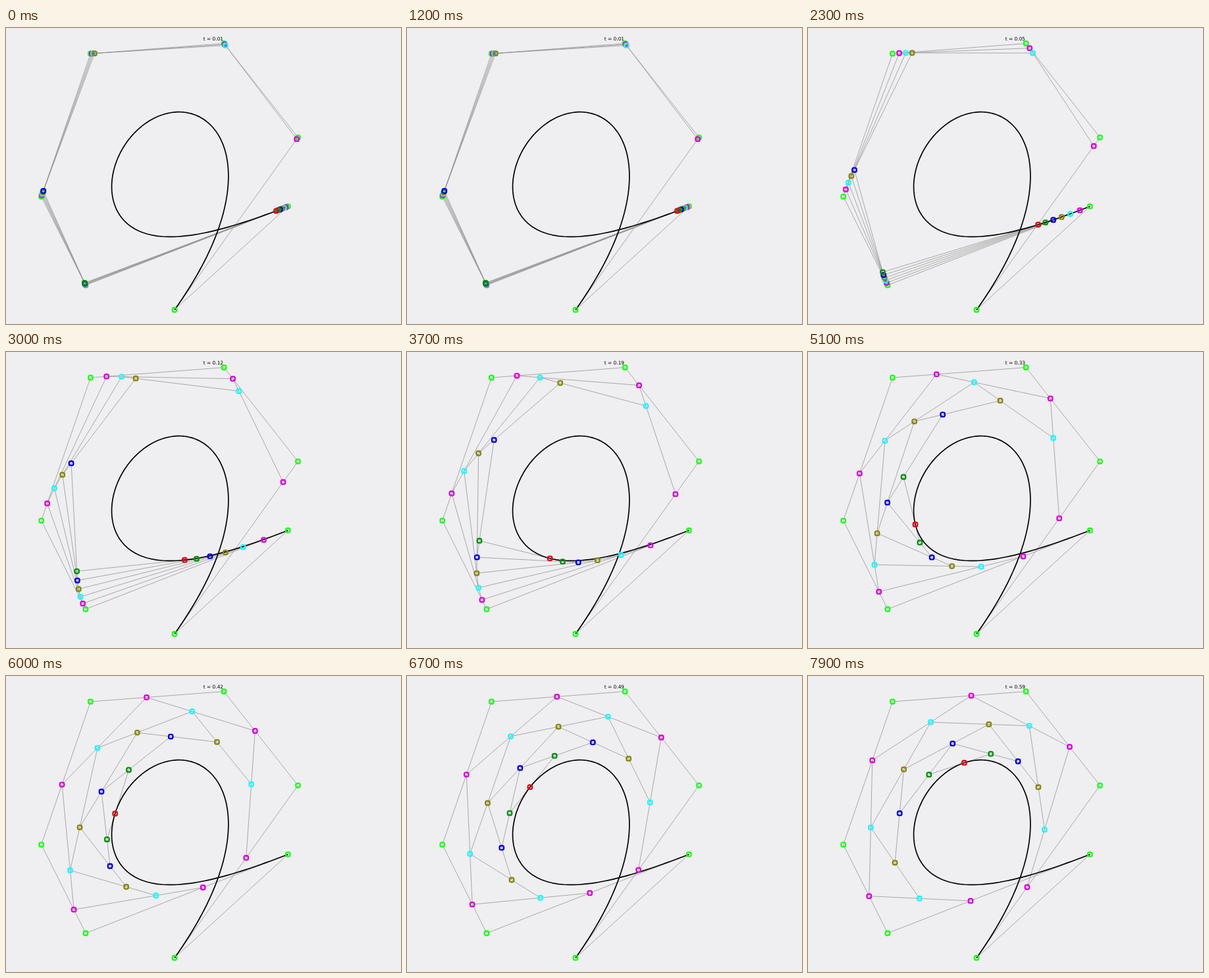
Recreate the animation shown at these times as an HTML page with a canvas. Size 600 by 450 pixels, loop 8 s.

```html
<!DOCTYPE html>
<html lang="en">
<head>
<meta charset="utf-8">
<title>Rational De Casteljau construction</title>
<style>
html, body { margin: 0; width: 100%; height: 100%; overflow: hidden; background: #efeef0; }
canvas { display: block; }
</style>
</head>
<body>
<canvas id="stage" width="600" height="450"></canvas>
<script>
const ctx = document.getElementById("stage").getContext("2d");
const LOOP = 8000;
const STEP = 100;
// x, y, weight
const control = [
  [428.3, 271.2, 2], [121, 391, 2], [53.7, 256.3, 1], [128.4, 39, 1],
  [331.1, 23.5, 1], [443.5, 166.3, 1], [256, 428.5, 1]
];
const colors = ["#1cff1c", "#d808d8", "#1cf8ff", "#87870c", "#0404d8", "#089010", "#e00818"];

function blend([ax, ay, aw], [bx, by, bw], t) {
  const w = aw + (bw - aw) * t;
  const f = t * bw / w;
  return [ax + (bx - ax) * f, ay + (by - ay) * f, w];
}

function levelsAt(t) {
  const levels = [control];
  for (let points = control; points.length > 1;) {
    points = points.slice(1).map((p, i) => blend(points[i], p, t));
    levels.push(points);
  }
  return levels;
}

const curve = [];
for (let i = 0; i <= 200; i++) curve.push(levelsAt(i / 200)[6][0]);

// Hundredths of t: starts after 1.8 s and stalls twice for two steps.
function hundredths(ms) {
  const n = Math.floor(ms / STEP);
  const stall = start => Math.max(0, Math.min(2, n - start));
  return 1 + Math.max(0, n - 17) - stall(19) - stall(69);
}

function polyline(points, color, width, closed) {
  ctx.beginPath();
  points.forEach(p => ctx.lineTo(p[0], p[1]));
  if (closed) ctx.closePath();
  ctx.strokeStyle = color;
  ctx.lineWidth = width;
  ctx.stroke();
}

function marker([x, y], color) {
  ctx.beginPath();
  ctx.roundRect(x - 3.2, y - 3.2, 6.4, 6.4, 2.4);
  ctx.strokeStyle = color;
  ctx.lineWidth = 2.4;
  ctx.stroke();
}

function draw(ms) {
  const t = hundredths(ms) / 100;
  const levels = levelsAt(t);
  ctx.fillStyle = "#efeef0";
  ctx.fillRect(0, 0, 600, 450);
  ctx.lineJoin = "round";
  levels.forEach((points, i) => polyline(points, "#909090", 0.75, i === 0));
  polyline(curve, "#000", 1.7, false);
  ctx.fillStyle = "#000";
  ctx.font = '7.4px "DejaVu Sans", sans-serif';
  ctx.fillText("t = " + t.toFixed(2), 299.8, 19);
  levels.forEach((points, i) => points.forEach(p => marker(p, colors[i])));
}

const begin = performance.now();
function tick() {
  draw((performance.now() - begin) % LOOP);
  requestAnimationFrame(tick);
}
tick();
</script>
</body>
</html>
```
